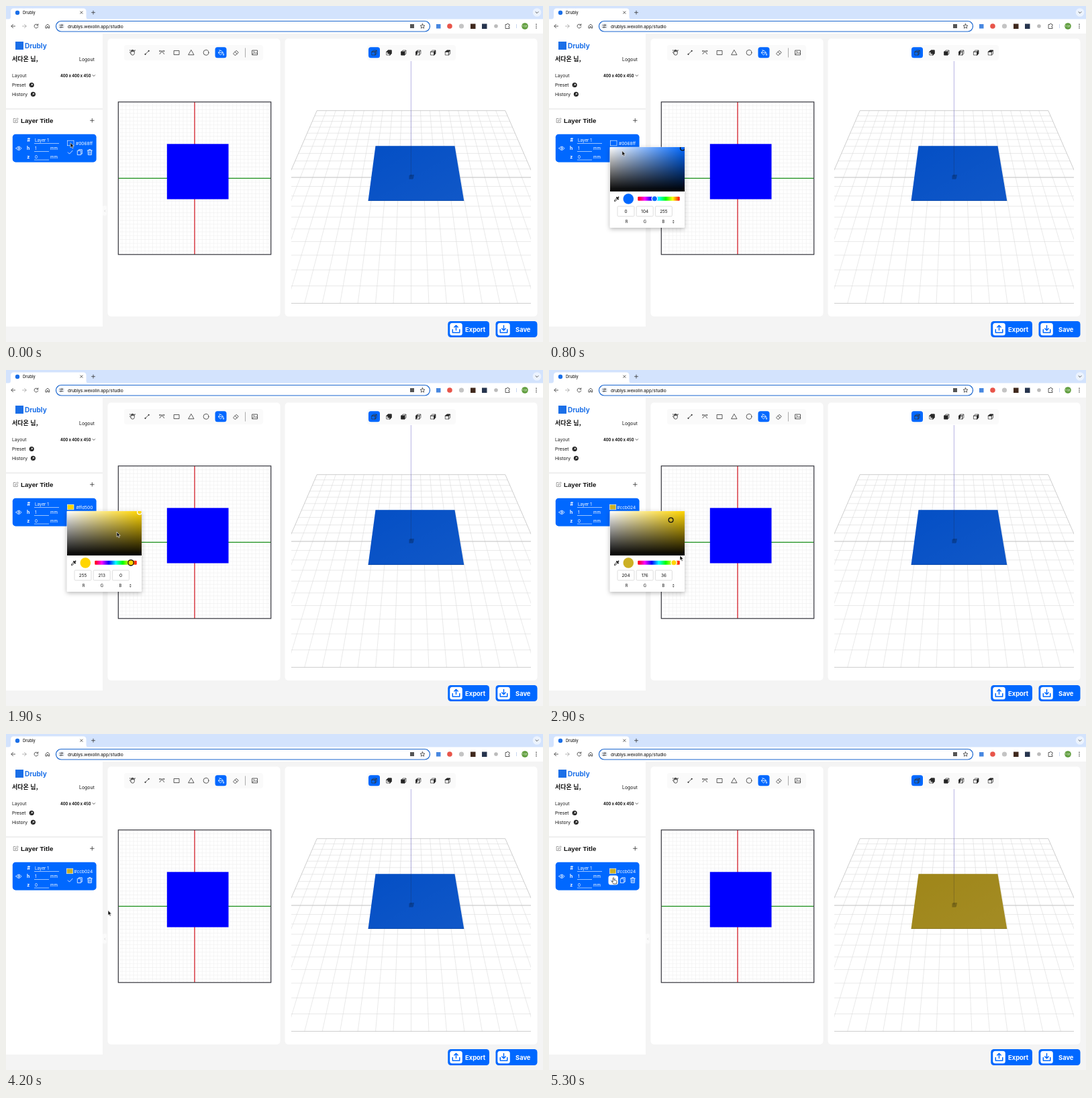
These frames come from a looping animation (800x500 px, 6.86 s). An HTML page:

```html
<!DOCTYPE html>
<html lang="ko">
<head>
<meta charset="utf-8">
<title>Studio</title>
<style>
html, body { margin: 0; width: 100%; height: 100%; overflow: hidden; background: #f4f4f4; }
svg { display: block; width: 800px; height: 500px; }
text { font-family: Inter, sans-serif; fill: #111; }
.ui { font-family: Roboto, sans-serif; }
.ko { font-family: "Noto Sans CJK KR", "Noto Sans CJK", sans-serif; }
.b { font-weight: 700; }
.w { fill: #fff; }
.mid { text-anchor: middle; }
.end { text-anchor: end; }
.ln { fill: none; stroke: #333; stroke-width: .8; stroke-linecap: round; stroke-linejoin: round; }
.wl { fill: none; stroke: #fff; stroke-width: .8; stroke-linecap: round; stroke-linejoin: round; }
.bl { fill: none; stroke: #0068ff; stroke-width: 1.5; stroke-linecap: round; stroke-linejoin: round; }
#picker { filter: drop-shadow(0 2px 3px rgba(0,0,0,.28)); }
</style>
</head>
<body>
<svg viewBox="0 0 800 500">
  <defs>
    <linearGradient id="sat"><stop stop-color="#fff"/><stop offset="1" stop-color="#fff" stop-opacity="0"/></linearGradient>
    <linearGradient id="val" x2="0" y2="1"><stop stop-color="#000" stop-opacity="0"/><stop offset="1"/></linearGradient>
    <linearGradient id="sheen" x2="1" y2="1"><stop stop-color="#fff" stop-opacity="0"/><stop offset="1" stop-color="#fff" stop-opacity=".05"/></linearGradient>
    <linearGradient id="hues"></linearGradient>
    <clipPath id="view"><rect x="425" y="82" width="357" height="361"/></clipPath>
    <clipPath id="field"><rect x="91" y="210" width="111" height="66"/></clipPath>
  </defs>
  <rect width="800" height="500" fill="#f4f4f4"/>

  <!-- browser -->
  <rect width="800" height="20" fill="#d3e3fd"/>
  <path d="M3 20q4 0 4-4V8q0-4.500 4.500-4.500h103.500q4.500 0 4.500 4.500v8q0 4 4 4z" fill="#fff"/>
  <rect y="19.500" width="800" height="21.500" fill="#fff"/>
  <circle cx="17" cy="10" r="3.200" fill="#1a6fe8"/>
  <text class="ui" x="25" y="12.200" font-size="6.600">Drubly</text>
  <path class="ln" d="M110.700 8l3.400 3.400m0-3.400l-3.400 3.400M127.500 9.700h5m-2.500-2.500v5"/>
  <circle cx="791" cy="9.500" r="6.300" fill="#ecf3fe"/>
  <path class="ln" d="M789 8.700l2 2 2-2"/>
  <path class="ln" d="M13.500 30h-5.500m2.500-2.700L7.800 30l2.700 2.700"/>
  <path class="ln" stroke-opacity=".45" d="M24.500 30h5.500m-2.500-2.700l2.700 2.700-2.700 2.700"/>
  <path class="ln" d="M47.500 28.500a2.900 2.900 0 1 0 .3 2.300M47.800 26.800v2h-2M59.300 29.500l2.700-2.400 2.700 2.400v3.400h-1.800v-2.200h-1.800v2.200h-1.800z"/>
  <rect x="74.500" y="22.500" width="557" height="15.500" rx="7.700" fill="#fff" stroke="#1a66cf" stroke-width="1.200"/>
  <circle cx="82.500" cy="30" r="5" fill="#eef2f8"/>
  <path class="ln" d="M80 28.500h2m2.200 0h.8M80 31.500h.8m2.200 0h2"/>
  <circle class="ln" cx="83.300" cy="28.500" r=".8"/><circle class="ln" cx="81.800" cy="31.500" r=".8"/>
  <text class="ui" x="92" y="32.500" font-size="6.900">drublys.wexolin.app/studio</text>
  <rect x="602" y="27" width="6" height="6" fill="#555"/>
  <path class="ln" d="M620.500 26.700l1 2.200 2.400.2-1.800 1.600.6 2.400-2.200-1.300-2.200 1.300.6-2.400-1.800-1.600 2.400-.2z"/>
  <rect x="641" y="27" width="6.500" height="6.500" fill="#4787e0"/>
  <circle cx="661" cy="30" r="3.800" fill="#e8554a"/>
  <circle cx="678.500" cy="30" r="3.600" fill="#c4c4c4"/>
  <rect x="692" y="26.500" width="7.500" height="7.500" fill="#40291d"/>
  <rect x="709" y="26.500" width="7.500" height="7.500" fill="#26344d"/>
  <circle cx="730" cy="30" r="2.800" fill="#bbb"/>
  <path class="ln" d="M744.500 27.500h1.700q.3-1.500 1.300-1.500t1.300 1.500h1.200v2.300q-1.300.2-1.300 1t1.300 1v1.700h-5.500z"/>
  <path d="M760.500 27v6" stroke="#c6d6ee"/>
  <circle cx="773" cy="30" r="4.800" fill="#5d9c3a"/>
  <text class="ko mid w" x="773" y="31.500" font-size="4">다온</text>
  <g fill="#333"><circle cx="790" cy="27.300" r=".8"/><circle cx="790" cy="30" r=".8"/><circle cx="790" cy="32.700" r=".8"/></g>

  <!-- sidebar -->
  <path d="M0 41h144v436H0z" fill="#fff"/>
  <path d="M0 153.200h144" stroke="#f1f1f1" stroke-width="2.600"/>
  <rect x="144" y="297" width="6" height="15" rx="2" fill="#fafafa"/>
  <path d="M148 303.500l-1.300 1.500 1.300 1.500" fill="none" stroke="#ccc" stroke-width=".7"/>
  <rect x="14" y="53" width="12" height="12" fill="#1a6fe8"/>
  <text class="b" x="28" y="63" font-size="10" style="fill:#1a6fe8">Drubly</text>
  <text class="ko b" x="9" y="82" font-size="9">서다온 님,</text>
  <text x="109" y="81.500" font-size="6.900">Logout</text>
  <g font-size="6.800">
    <text x="9" y="106" style="fill:#222">Layout</text>
    <text x="9" y="120">Preset</text>
    <text x="9" y="134">History</text>
  </g>
  <text class="b" x="81" y="105.700" font-size="5.600">400 x 400 x 450</text>
  <path class="ln" d="M129 102.700l1.800 1.800 1.800-1.800"/>
  <circle cx="38.200" cy="117.500" r="3.500" fill="#1b1b1b"/><circle cx="40.400" cy="131.300" r="3.500" fill="#1b1b1b"/>
  <path class="wl" d="M36.900 118.800l2.500-2.500h-1.800m1.800 0v1.800M39.100 132.600l2.500-2.500h-1.800m1.800 0v1.800"/>
  <path class="ln" style="stroke:#888" d="M14 167.500h-2.800v6h6v-2.800M13.500 171.500l.3-1.600 3.300-3.200 1.200 1.200-3.200 3.300z"/>
  <text class="b" x="22" y="173.800" font-size="9.700" style="font-family:'Liberation Sans',sans-serif">Layer Title</text>
  <path class="ln" d="M125.500 170.300h5.600m-2.800-2.800v5.600"/>

  <!-- layer card -->
  <rect x="9.800" y="190.800" width="124.800" height="41.600" rx="4.500" fill="#0068ff"/>
  <path class="wl" d="M15 211.800q4-5.600 8 0q-4 5.600-8 0z"/><circle class="wl" cx="19" cy="211.800" r="1.300"/>
  <g font-size="7">
    <text class="w b mid" x="33.700" y="201.700">#</text>
    <text class="w b mid" x="33.200" y="214.300">h</text>
    <text class="w b mid" x="33.200" y="226.600">z</text>
  </g>
  <g font-size="6.300">
    <text class="w" x="43" y="201.500">Layer 1</text>
    <text class="w" x="43" y="214">1</text><text class="w" x="66" y="214">mm</text>
    <text class="w" x="43" y="226.500">0</text><text class="w" x="66" y="226.500">mm</text>
  </g>
  <path d="M42 204.500h37M42 216.500h22M42 229h22" stroke="#fff" stroke-width=".6"/>
  <rect id="swatch" y="200.200" width="9.500" height="7.600" stroke="#fff" stroke-width=".6"/>
  <text id="hex" class="w end" x="129.300" y="206.500" font-size="6.600"></text>
  <rect id="hover" x="88.500" y="210.500" width="14.500" height="14" rx="3.500" fill="#fff"/>
  <path id="check" class="wl" d="M92.200 217.800l2.300 2.300 4.500-4.800"/>
  <path class="wl" d="M108.500 215v-1.300h4.800v6.300h-1.200M106.700 215.200h5v6.300h-5zM121.300 215h7m-4.700 0v-1.500h2.400v1.500m-4 0l.3 6.500h5l.3-6.500m-3.800 2v3m2 -3v3"/>

  <!-- flat editor -->
  <rect x="151.500" y="48.500" width="257" height="413.500" rx="5" fill="#fff"/>
  <rect x="176" y="58" width="207" height="23" rx="4" fill="#fafafa"/>
  <path class="ln" d="M186 71l-1.600-2.200 1-.6 1 1v-3.200h1.200v2-2.700h1.200v2.700-2.300h1.200v2.500-1.700h1.300v4.200q-.4 2.400-2.700 2.400T186 71zM184.800 66.500v-1m7.300 0v1M207.800 71.500l4.700-4.500M229 71.500q3.300-7 6.500 0M229 67h6.500M250.500 66.500h7.500v6h-7.500zM276 65.700l4 7h-8zM339.200 70.200l4-4 3 3-4 4h-1.500l-1.500-1.500zm1.900-1.900l3 3M367 66h7.500v6.800H367zM367.500 71.800l2.300-2.500 1.500 1.300 1.300-1.300 1.700 1.900"/>
  <g fill="#333"><circle cx="207.500" cy="71.800" r="1.100"/><circle cx="212.700" cy="66.800" r="1.100"/><circle cx="229" cy="67" r=".8"/><circle cx="235.500" cy="67" r=".8"/><circle cx="369.300" cy="68" r=".7"/></g>
  <circle class="ln" cx="298" cy="69.300" r="3.900"/>
  <rect x="311.500" y="61.300" width="17" height="16" rx="3.500" fill="#0068ff"/>
  <path class="wl" d="M316.300 69.200l3.700-3.400 3.400 3.400-3.500 3.500zM316.500 69.300h6.800M319 66.700l-1.300-1.500M324 71q1.600 2.200 0 2.500q-1.500-.3 0-2.500"/>
  <path d="M356.500 62.500v14" stroke="#999" stroke-width=".8"/>
  <path id="mesh" fill="none" stroke="#efefef" stroke-width=".6"/>
  <path d="M281 143v227" stroke="#d4202a" stroke-width="1.300"/>
  <path d="M167.500 256.300h227" stroke="#1a8f1a" stroke-width="1.300"/>
  <rect x="167.300" y="142.800" width="227.400" height="227" fill="none" stroke="#35353c" stroke-width="1.200"/>
  <rect x="239.800" y="205.300" width="91.700" height="82.200" fill="#00f"/>

  <!-- space view -->
  <rect x="415.500" y="48.500" width="376" height="413.500" rx="5" fill="#fff"/>
  <rect x="538" y="58" width="132" height="23" rx="4" fill="#fafafa"/>
  <rect x="540" y="61.300" width="17" height="16" rx="3.500" fill="#0068ff"/>
  <g id="cubes" class="ln"></g>
  <g clip-path="url(#view)" fill="none">
    <path id="floor" stroke="#dadada" stroke-width=".6"/>
    <path id="rim" stroke="#b8b8b8" stroke-width=".7"/>
  </g>
  <path id="slab" d="M550.500 208.300h118L682.300 290H539.500z"/>
  <path d="M550.500 208.300h118L682.300 290H539.500z" fill="url(#sheen)"/>
  <path d="M539.500 289.700H682.300" stroke="#000" stroke-opacity=".2" stroke-width=".8"/>
  <path d="M603.400 82v126.300" stroke="#6a62c8" stroke-opacity=".6" stroke-width=".8"/>
  <path d="M603.400 208.300V254" stroke="#223" stroke-opacity=".3" stroke-width=".8"/>
  <path d="M600.500 252.500l1.500-1.500h6l-1 5.500-1.300 1.300h-5.200z" fill="#000" fill-opacity=".24"/>

  <!-- actions -->
  <rect x="658.300" y="469" width="61.700" height="24" rx="4.500" fill="#0068ff"/>
  <rect x="729.500" y="469" width="62" height="24" rx="4.500" fill="#0068ff"/>
  <rect x="661.300" y="471.700" width="18.500" height="18.500" rx="3.500" fill="#fff"/>
  <rect x="732.300" y="471.700" width="18.500" height="18.500" rx="3.500" fill="#fff"/>
  <path class="bl" d="M665.300 481.500v4.500h10.500v-4.500M670.500 482.500v-7m-2.700 2.500l2.700-2.700 2.700 2.700M736.300 481.500v4.500h10.500v-4.500M741.500 475.500v7m-2.700-2.500l2.700 2.700 2.700-2.700"/>
  <text class="b w" x="684" y="484.700" font-size="9.400">Export</text>
  <text class="b w" x="759" y="484.700" font-size="9.400">Save</text>

  <!-- colour picker -->
  <g id="picker">
    <rect x="90.500" y="209.800" width="111.500" height="120.200" rx="1" fill="#fff"/>
    <g clip-path="url(#field)">
      <rect id="base" x="91" y="210" width="111" height="66"/>
      <rect x="91" y="210" width="111" height="66" fill="url(#sat)"/>
      <rect x="91" y="210" width="111" height="66" fill="url(#val)"/>
      <circle id="spot" r="3.400" stroke-width="1.300"/>
    </g>
    <path d="M97.500 290.500l.4-1.700 3.300-3.300 1.300 1.300-3.300 3.300z" fill="none" stroke="#111" stroke-width=".9"/>
    <path d="M100.700 284.800l2.600 2.600M102 286l1.600-1.600" stroke="#111" stroke-width="1.600" stroke-linecap="round"/>
    <circle id="blob" cx="118.300" cy="287" r="7.800"/>
    <rect x="132.300" y="283.800" width="62.400" height="6" rx="1" fill="url(#hues)"/>
    <circle id="thumb" cy="286.800" r="4.200" stroke-width="1.300"/>
    <g fill="#fff" stroke="#cfcfcf" stroke-width=".7">
      <rect x="102" y="298" width="25" height="15" rx="1.500"/><rect x="130.200" y="298" width="25" height="15" rx="1.500"/><rect x="158.400" y="298" width="25" height="15" rx="1.500"/>
    </g>
    <g class="mid" font-size="6.400">
      <text class="num" x="114.500" y="307.800"></text><text class="num" x="142.700" y="307.800"></text><text class="num" x="170.900" y="307.800"></text>
      <text x="115.500" y="323.200" font-size="5.800">R</text><text x="143" y="323.200" font-size="5.800">G</text><text x="170.300" y="323.200" font-size="5.800">B</text>
    </g>
    <path d="M183.800 320.300l1.500-1.800 1.500 1.800zm0 1.400l1.500 1.800 1.500-1.800z" fill="#444"/>
  </g>

  <path id="arrow" d="M0 0v7.300l1.700-1.500 1.200 2.700 1.300-.6-1.200-2.600h2.300z" fill="#111" stroke="#fff" stroke-width=".6"/>
  <path id="hand" d="M-1.300 3.500V-2.200q.9-1.300 1.700 0V.800l3.300.8q.9.300.8 1.500l-.5 3.400H-.5L-3 3.200q-.3-1.300 1-.6z" fill="#fff" stroke="#222" stroke-width=".7"/>
</svg>
<script>
const $ = id => document.getElementById(id);
const set = (el, attrs) => { for (const k in attrs) el.setAttribute(k, attrs[k]); };
const LOOP = 6860, OPEN = 200, PICK_HUE = 1600, DRAG = 2200, DROP = 2800,
      CLOSE = 4000, HOVER = 4500, APPLY = 5200;

// cursor tip: time, x, y
const path = [
  [0, 96, 203.5], [700, 96, 203.5], [1400, 185.7, 287], [1600, 185.7, 287],
  [1900, 165, 241], [2200, 165, 241], [2800, 181.6, 223.2], [2900, 195, 276],
  [3100, 199, 297], [3800, 200, 297], [4200, 152, 262.5], [4500, 97, 218],
  [4600, 96.5, 216.5], [LOOP, 96.5, 216.5]
];

function tipAt(t) {
  const i = path.findIndex((p, n) => n && t <= p[0]);
  const [t0, x0, y0] = path[i - 1], [t1, x1, y1] = path[i];
  const k = (t - t0) / (t1 - t0);
  return [x0 + (x1 - x0) * k, y0 + (y1 - y0) * k];
}

function hsv(h, s, v) {
  const ch = n => {
    const k = (n + h / 60) % 6;
    return Math.round(255 * v * (1 - s * Math.max(0, Math.min(k, 4 - k, 1))));
  };
  return [ch(5), ch(3), ch(1)];
}
const hexOf = rgb => "#" + rgb.map(c => c.toString(16).padStart(2, "0")).join("");

function colourAt(t) {
  const h = t < PICK_HUE ? 215.53 : 50.1;
  if (t < DRAG) return [h, 1, 1];
  const [x, y] = tipAt(Math.min(t, DROP));
  return [h, (x - 91) / 110, 1 - (y - 210) / 66];
}

function buildScene() {
  let mesh = "";
  for (let i = 1; i < 40; i++) {
    const d = i * 5.685;
    mesh += `M${167.3 + d} 143v227M167.3 ${142.8 + d}h227`;
  }
  set($("mesh"), { d: mesh });

  // floor in perspective, u across and w towards the viewer
  const horizon = -168, far = 1 / (155.7 - horizon), near = 1 / (442.4 - horizon);
  const pt = (u, w) => {
    const depth = 1 / (far + (near - far) * (w + 1) / 2);
    return `${(603.5 + u * .4334 * depth).toFixed(2)} ${(depth + horizon).toFixed(2)}`;
  };
  let floor = "";
  for (let i = 1; i < 20; i++) {
    const a = i / 10 - 1;
    floor += `M${pt(a, -1)}L${pt(a, 1)}M${pt(-1, a)}L${pt(1, a)}`;
  }
  set($("floor"), { d: floor });
  set($("rim"), { d: `M${pt(-1, -1)}L${pt(1, -1)}L${pt(1, 1)}L${pt(-1, 1)}ZM${pt(-1, 0)}L${pt(1, 0)}` });

  // view buttons: cubes with one dark face
  const top = "M-3.5-1.5l2-2h5l-2 2z", front = "M-3.5-1.5h5v5h-5z", side = "M1.5-1.5l2-2v5l-2 2z",
        back = "M-1.5-3.5h5v5h-5z", left = "M-3.5-1.5l2-2v5l-2 2z";
  const faces = ["", top + side + back, front, left, side, top];
  $("cubes").innerHTML = faces.map((f, i) =>
    `<g transform="translate(${548.7 + i * 21.9} 69.5)" stroke-width=".7">
      <path d="${top + front + side}"/><path d="${f}" fill="#222"/></g>`).join("");

  $("hues").innerHTML = [0, 1, 2, 3, 4, 5, 6].map(i =>
    `<stop offset="${i / 6}" stop-color="${hexOf(hsv((360 - i * 60) % 360, 1, 1))}"/>`).join("");
}

const nums = document.querySelectorAll(".num");

function draw(t) {
  const [h, s, v] = colourAt(t), rgb = hsv(h, s, v), hex = hexOf(rgb);
  const pure = hexOf(hsv(h, 1, 1)), hueFocus = t >= PICK_HUE && t < DRAG;
  const [x, y] = tipAt(t), over = t >= HOVER;
  const show = (id, on) => set($(id), { visibility: on ? "visible" : "hidden" });

  set($("swatch"), { fill: hex, x: t >= DRAG ? 90.3 : 91.5 });
  $("hex").textContent = hex;
  set($("base"), { fill: pure });
  set($("blob"), { fill: hex });
  set($("spot"), {
    cx: Math.min(199, 91 + s * 110), cy: Math.max(211.5, 210 + (1 - v) * 66),
    fill: hex, stroke: hueFocus ? "#fff" : "#111"
  });
  set($("thumb"), {
    cx: 132.3 + 62.4 * (1 - h / 360), fill: pure, stroke: hueFocus ? "#111" : "#fff"
  });
  nums.forEach((n, i) => n.textContent = rgb[i]);
  set($("slab"), { fill: t < APPLY ? "#044fc5" : "#9f8619" });
  set($("check"), { style: over ? "stroke:#0068ff" : "" });

  show("picker", t >= OPEN && t < CLOSE);
  show("hover", over);
  show("arrow", !over);
  show("hand", over);
  set($(over ? "hand" : "arrow"), { transform: `translate(${x} ${y})` });
}

function tick() {
  draw(Math.floor(performance.now() % LOOP / 100) * 100);
  requestAnimationFrame(tick);
}
buildScene();
tick();
</script>
</body>
</html>
```
